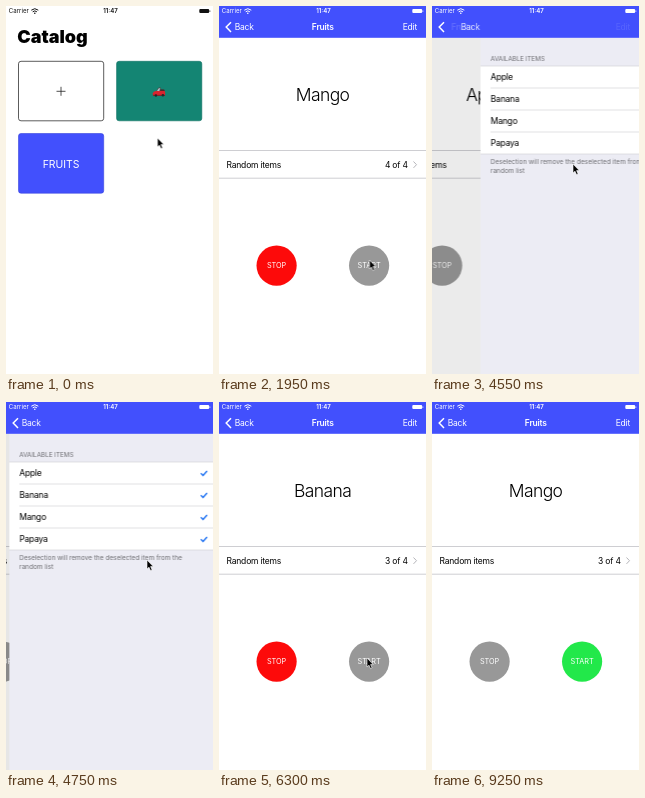
These frames come from a looping animation (207x368 px, 9.35 s). An HTML page:

```html
<!DOCTYPE html>
<html lang="en">
<head>
<meta charset="utf-8">
<title>Random item picker</title>
<style>
  html, body { margin: 0; width: 100%; height: 100%; overflow: hidden; background: #fff; }
  svg { display: block; width: 100%; height: 100%; font: 8.5px Inter, "Liberation Sans", sans-serif; letter-spacing: -.2px; }
  .mid { text-anchor: middle; }
  .end { text-anchor: end; }
  .loose { letter-spacing: 0; }
  .anim { animation: 9350ms linear infinite; }

  #catalog { animation-name: catalog; }
  #fruits { animation-name: fruits; }
  #items { animation-name: items; }
  #nav { animation-name: nav; }
  #status { animation-name: status; }
  #shade1 { animation-name: shade1; }
  #shade2 { animation-name: shade2; }
  #title { animation-name: title; }
  #back1 { animation-name: back1; }
  #back2 { animation-name: back2; }
  #edit { animation-name: edit; }
  #cursor { animation-name: cursor; }

  /* push 430-950, push 4300-4840, pop 5396-5896 */
  @keyframes catalog {
    0%, 4.6% { transform: translateX(0); animation-timing-function: ease; }
    10.16%, 100% { transform: translateX(-62px); }
  }
  @keyframes shade1 {
    0%, 4.6% { opacity: 0; animation-timing-function: ease; }
    10.16%, 100% { opacity: .1; }
  }
  @keyframes nav {
    0%, 4.6% { transform: translateX(207px); animation-timing-function: ease; }
    10.16%, 100% { transform: translateX(0); }
  }
  @keyframes status {
    0%, 4.6% { color: #111; }
    8%, 100% { color: #fff; }
  }
  @keyframes fruits {
    0%, 4.6% { transform: translateX(207px); animation-timing-function: ease; }
    10.16%, 45.99% { transform: translateX(0); animation-timing-function: ease; }
    51.76%, 57.71% { transform: translateX(-62px); animation-timing-function: ease; }
    63.06%, 100% { transform: translateX(0); }
  }
  @keyframes shade2 {
    0%, 45.99% { opacity: 0; animation-timing-function: ease; }
    51.76%, 57.71% { opacity: .1; animation-timing-function: ease; }
    63.06%, 100% { opacity: 0; }
  }
  @keyframes items {
    0%, 45.99% { transform: translateX(207px); animation-timing-function: ease; }
    51.76%, 57.71% { transform: translateX(0); animation-timing-function: ease; }
    63.06%, 100% { transform: translateX(207px); }
  }
  @keyframes title {
    0%, 45.99% { transform: translateX(0); opacity: 1; animation-timing-function: ease; }
    51%, 57.71% { transform: translateX(-88px); opacity: 0; animation-timing-function: ease; }
    63.06%, 100% { transform: translateX(0); opacity: 1; }
  }
  @keyframes back1 {
    0%, 45.99% { transform: translateX(0); opacity: 1; animation-timing-function: ease; }
    51%, 57.71% { transform: translateX(-70px); opacity: 0; animation-timing-function: ease; }
    63.06%, 100% { transform: translateX(0); opacity: 1; }
  }
  @keyframes back2 {
    0%, 45.99% { transform: translateX(80px); opacity: 0; animation-timing-function: ease; }
    51%, 57.71% { transform: translateX(0); opacity: 1; animation-timing-function: ease; }
    60%, 100% { transform: translateX(70px); opacity: 0; }
  }
  @keyframes edit {
    0%, 45.99% { opacity: 1; }
    49%, 57.71% { opacity: 0; }
    60.5%, 100% { opacity: 1; }
  }
  @keyframes cursor {
    0%, .53% { transform: translate(151.5px, 132px); animation-timing-function: ease-in-out; }
    3.53%, 10.16% { transform: translate(66px, 162px); animation-timing-function: ease-in-out; }
    15.51%, 43.85% { transform: translate(150.5px, 254px); animation-timing-function: ease-in-out; }
    45.56%, 50.8% { transform: translate(141px, 158px); animation-timing-function: ease-in-out; }
    53.48%, 54.33% { transform: translate(146px, 135px); animation-timing-function: ease-in-out; }
    57.01%, 57.75% { transform: translate(16px, 20px); animation-timing-function: ease-in-out; }
    60.96% { transform: translate(133.3px, 245px); }
    63.64%, 67.38% { transform: translate(148px, 256px); animation-timing-function: ease-in-out; }
    71.66%, 89.84% { transform: translate(139.7px, 289px); animation-timing-function: ease-in-out; }
    93.05%, 97.8% { transform: translate(60px, 258px); opacity: 1; }
    97.81%, 100% { transform: translate(60px, 258px); opacity: 0; }
  }
</style>
</head>
<body>
<svg viewBox="0 0 207 368">
  <g id="catalog" class="anim">
    <rect width="207" height="368" fill="#fff"/>
    <text class="loose" x="11.3" y="37" font-size="18" font-weight="900">Catalog</text>
    <rect x="12.5" y="55.3" width="85.2" height="59.5" rx="2.5" fill="#fff" stroke="#333" stroke-width=".8"/>
    <path d="M50.5 85.3h9M55 80.8v9" stroke="#222" stroke-width=".8"/>
    <rect x="110.6" y="55.3" width="85.2" height="59.5" rx="2.5" fill="#148573" stroke="#0d6f62" stroke-width=".6"/>
    <g>
      <path d="M150.3 85.5l2.4-3.6h1.8l-1 3.6z" fill="#a9c6cf" stroke="#6b2226" stroke-width=".5"/>
      <path d="M154 85l.8-1.8 3.4.3.8 2z" fill="#4b2a2c"/>
      <path d="M146.8 87.3q.3-2 3-2.2l9-.2q.8 2.4.2 4.6h-12.2z" fill="#d9242f"/>
      <path d="M147 88.8h12v1h-12z" fill="#8c1720"/>
      <circle cx="149.9" cy="89.5" r="1.3" fill="#25272b"/>
      <circle cx="156.9" cy="89.2" r="1.3" fill="#25272b"/>
    </g>
    <rect x="12.5" y="127.5" width="85.2" height="59.7" rx="2.5" fill="#4250fd" stroke="#3643dc" stroke-width=".6"/>
    <text class="mid loose" x="55" y="161.7" font-size="10.4" fill="#fff">FRUITS</text>
    <rect id="shade1" class="anim" width="207" height="368"/>
  </g>

  <g id="fruits" class="anim">
    <rect width="207" height="368" fill="#fff"/>
    <text id="word" class="mid" x="103.6" y="95" font-size="17.5" font-weight="300" letter-spacing="-.6">Apple</text>
    <path d="M0 144.5h207M0 172.2h207" stroke="#c9c9cd" stroke-width=".9"/>
    <text x="7.5" y="161.7">Random items</text>
    <text id="count" class="end" x="188.7" y="161.7">4 of 4</text>
    <path d="M194.5 155.5l3 3.2-3 3.2" fill="none" stroke="#b5b5ba" stroke-width="1"/>
    <g class="mid loose" font-size="7.3" fill="#fff">
      <circle id="stop" cx="57.6" cy="259.6" r="20.1"/>
      <text x="57.6" y="262.3">STOP</text>
      <circle id="start" cx="150.1" cy="259.6" r="20.1"/>
      <text x="150.1" y="262.3">START</text>
    </g>
    <rect id="shade2" class="anim" width="207" height="368"/>
  </g>

  <g id="items" class="anim">
    <rect width="207" height="368" fill="#ececf4"/>
    <g class="loose" font-size="6.5" fill="#6d6d72">
      <text x="10" y="54.8" font-size="6.3">AVAILABLE ITEMS</text>
      <text x="10" y="158.2">Deselection will remove the deselected item from the</text>
      <text x="10" y="167">random list</text>
    </g>
    <rect y="60" width="207" height="88" fill="#fff"/>
    <path d="M0 60h207M10 82h197M10 104h197M10 126h197M0 148h207" stroke="#cdcdd2" stroke-width=".6"/>
    <text x="10" y="74">Apple</text>
    <text x="10" y="96">Banana</text>
    <text x="10" y="118">Mango</text>
    <text x="10" y="140">Papaya</text>
    <g fill="none" stroke="#1b6ff2" stroke-width="1.3">
      <path d="M191.5 71.2l2.2 2.3 4-4.5"/>
      <path d="M191.5 93.2l2.2 2.3 4-4.5"/>
      <path d="M191.5 115.2l2.2 2.3 4-4.5"/>
      <path id="tick" d="M191.5 137.2l2.2 2.3 4-4.5"/>
    </g>
  </g>

  <g id="nav" class="anim" fill="#fff">
    <rect width="207" height="31.8" fill="#4250fd"/>
    <path d="M12 16.2l-4.8 4.9 4.8 4.9" fill="none" stroke="#fff" stroke-width="1.5"/>
    <text id="back1" class="anim" x="15.7" y="24.1">Back</text>
    <text id="back2" class="anim" x="15.7" y="24.1">Back</text>
    <text id="title" class="anim mid" x="103.8" y="24.1" font-weight="600">Fruits</text>
    <text id="edit" class="anim end" x="198" y="24.1">Edit</text>
  </g>

  <g id="status" class="anim loose" fill="currentColor" font-size="6.1">
    <text x="2.8" y="7.3">Carrier</text>
    <g fill="none" stroke="currentColor" stroke-width="1">
      <path d="M25.3 4.2q3.5-3 7 0M26.7 5.8q2.1-1.8 4.2 0"/>
    </g>
    <circle cx="28.8" cy="7.2" r=".8"/>
    <text class="mid" x="104.5" y="7.3" font-weight="600">11:47</text>
    <rect x="193.3" y="3.1" width="9.8" height="4" rx="1"/>
    <rect x="203.5" y="4.3" width=".8" height="1.6" rx=".4"/>
  </g>

  <g id="cursor" class="anim">
    <path d="M0 0v9l2-1.8 1.5 3.4 1.6-.7-1.5-3.3h2.7z" fill="#000" stroke="#fff" stroke-width=".6"/>
  </g>
</svg>
<script>
  const LOOP = 9350;
  const $ = id => document.getElementById(id);
  const names = { A: 'Apple', B: 'Banana', M: 'Mango', P: 'Papaya' };
  const draws = [
    [0, 'A'], [1700, 'B'], [1875, 'M'], [2050, 'P'], [2200, 'A'], [2375, 'B'],
    [2550, 'P'], [2725, 'M'], [2900, 'B'], [3050, 'M'], [3200, 'A'], [3350, 'P'],
    [3525, 'B'], [3700, 'M'], [3850, 'B'], [4100, 'A'],
    [6300, 'B'], [6475, 'M'], [6650, 'B'], [6900, 'M'], [7000, 'A'], [7200, 'M'],
    [7350, 'B'], [7550, 'A'], [7750, 'M'], [7900, 'A'], [8000, 'M'], [8250, 'B'],
    [8400, 'A'], [8575, 'M']
  ];
  const runs = [[1550, 4260], [6150, 8750]];
  const removed = 5050;
  let first;

  function show(t) {
    const on = runs.some(([a, b]) => t >= a && t < b);
    const [, key] = draws.filter(d => d[0] <= t).pop();
    $('word').textContent = names[key];
    $('count').textContent = (t < removed ? 4 : 3) + ' of 4';
    $('tick').style.opacity = t < removed ? 1 : 0;
    $('stop').style.fill = on ? '#fd0a0a' : '#989898';
    $('start').style.fill = on ? '#989898' : '#22e84a';
  }

  function tick(now) {
    first ??= now;
    show((now - first) % LOOP);
    requestAnimationFrame(tick);
  }
  show(0);
  requestAnimationFrame(tick);
</script>
</body>
</html>
```
